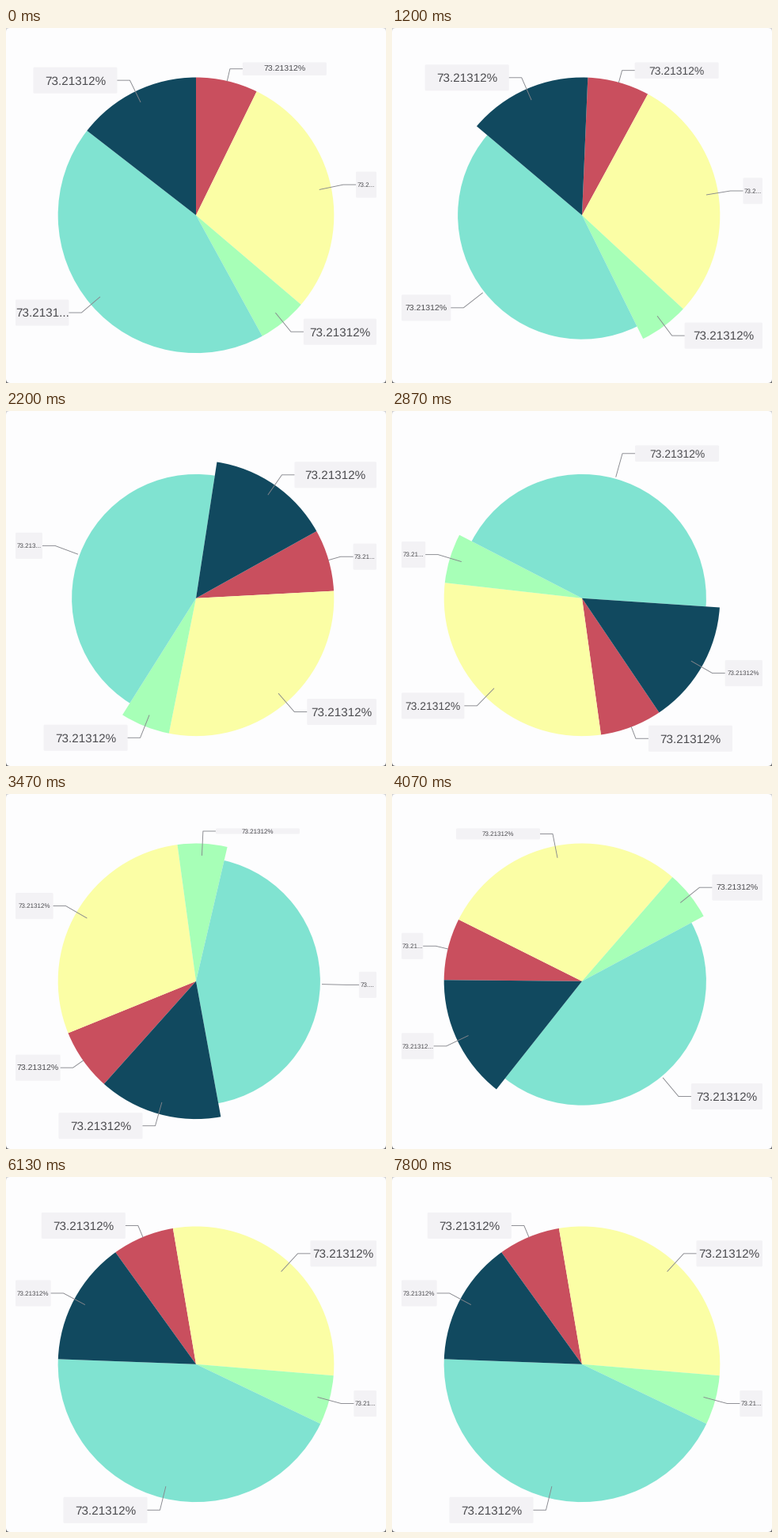
A matplotlib script for the animation above (7.87 s loop, 480 px wide and 449 px high).

```python
import numpy as np
import matplotlib.pyplot as plt
from matplotlib.animation import FuncAnimation
from matplotlib.patches import FancyBboxPatch, Rectangle, Wedge

plt.rcParams["text.hinting"] = "none"

W, H, DPI = 480, 449, 64
LOOP, TICK = 7870, 10
STEP = LOOP / 118                 # each pose holds for one step
CX, CY, R = 240, 236.8, 174.3
SMALL = 0.9                       # radius factor of the picked slice
ANCHOR, ELBOW, TAIL = 159.5, 190, 16
LEFT, RIGHT, TOP, BOTTOM = 12, 468, 43.5, 441
BOX_W, BOX_H = 106, 33
FONT_PX, LINE_H = 15.2, 17.5
SCALES = (1, 0.91, 0.69, 0.53)    # steps of the shrinking label font
LABEL = "73.21312%"

# share, colour, radius where the leader line becomes visible
SLICES = [
    (5, "#c94f5e", R),
    (20, "#fbfea5", ANCHOR),
    (4, "#a7ffb7", ANCHOR),
    (30, "#80e3d1", ANCHOR),
    (10, "#11495f", ANCHOR),
]
PICKED = 3
ENDS = np.cumsum([0] + [s[0] for s in SLICES]) * 360 / 69

# time in ms, rotation in degrees, speed in degrees per ms
SPIN = [
    (800, 0, 0),
    (1200, 2.4, 0.02),
    (2200, 60.8, 0.1),
    (3470, 222, 0.1),
    (4800, 305.7, 0.035),
    (5600, 324.3, 0),
]


def rotation(t):
    if t <= SPIN[0][0]:
        return 0
    for (t0, a, va), (t1, b, vb) in zip(SPIN, SPIN[1:]):
        if t < t1:
            d = t1 - t0
            u = (t - t0) / d
            return (a * (1 + 2 * u) * (1 - u) ** 2 + b * u * u * (3 - 2 * u)
                    + d * (va * u * (1 - u) ** 2 - vb * u * u * (1 - u)))
    return SPIN[-1][1]


def ease(t, start, length):
    u = np.clip((t - start) / length, 0, 1)
    return u * u * (3 - 2 * u)


def text_width(text):
    em = sum({".": 0.278, "%": 0.889}.get(c, 0.556) for c in text)
    return em * FONT_PX


def truncate(width):
    for n in range(len(LABEL) - 1, 0, -1):
        text = LABEL[:n] + "..."
        if text_width(text) <= width:
            return text
    return "..."


def fit(w, h, shrink=True):
    """Return the label text and font scale for a box of this size."""
    room = w + 0.3
    if not shrink:
        return truncate(room), 1
    for s in SCALES:
        if s * text_width(LABEL) <= w - 3 and s * LINE_H <= h - 4:
            return LABEL, s
    s = SCALES[-1]
    if s * text_width(LABEL) <= w - 3:
        return LABEL, s
    return truncate(room / s), s


def polar(angle, r):
    a = np.radians(angle)
    return CX + r * np.sin(a), CY - r * np.cos(a)


class Slice:
    def __init__(self, ax, i):
        self.i = i
        _, color, self.line_r = SLICES[i]
        self.wedge = ax.add_patch(Wedge((CX, CY), R, 0, 1, fc=color, ec="none", zorder=2))
        self.line, = ax.plot([], [], color="#85868c", lw=0.9 * 72 / DPI, zorder=3)
        self.box = ax.add_patch(FancyBboxPatch(
            (0, 0), 1, 1, boxstyle="round,pad=0,rounding_size=1.5",
            fc="#f3f2f5", ec="none", zorder=4))
        self.text = ax.text(0, 0, "", family="Liberation Sans", color="#4c4c50",
                            ha="center", va="baseline", zorder=5)

    def update(self, rot, radius):
        a, b = ENDS[self.i] + rot, ENDS[self.i + 1] + rot
        mid = (a + b) / 2
        self.wedge.set(theta1=a - 90, theta2=b - 90, radius=radius)

        x0, y0 = polar(mid, self.line_r)
        x1, y1 = polar(mid, ELBOW)
        if x1 >= CX:
            x2 = x1 + TAIL
            left, right = x2, min(x2 + BOX_W, RIGHT)
        else:
            x2 = x1 - TAIL
            left, right = max(x2 - BOX_W, LEFT), x2
        self.line.set_data([x0, x1, x2], [y0, y1, y1])

        half = max(1, min(BOX_H / 2, y1 - TOP, BOTTOM - y1))
        w, h = right - left, 2 * half
        self.box.set_bounds(left, y1 - half, w, h)

        # the picked label only starts shrinking once the pie turns
        label, s = fit(w, h, self.i != PICKED or rot > 0)
        px = s * FONT_PX
        self.text.set(text=label, fontsize=px * 72 / DPI,
                      position=((left + right) / 2, y1 + 0.345 * px))
        self.text.set_clip_path(self.box)


fig = plt.figure(figsize=(W / DPI, H / DPI), dpi=DPI, facecolor="#d4d4d6")
ax = fig.add_axes([0, 0, 1, 1])
ax.set(xlim=(0, W), ylim=(H, 0))
ax.axis("off")
ax.add_patch(Rectangle((0, H / 2), W, H / 2, fc="#6c6c6e", ec="none", zorder=0))
ax.add_patch(FancyBboxPatch((0, 0), W, H, boxstyle="round,pad=0,rounding_size=5",
                            fc="#fdfdfe", ec="none", zorder=1))
slices = [Slice(ax, i) for i in range(len(SLICES))]


def draw(frame):
    t = (frame * TICK + TICK / 2) // STEP * STEP
    rot = rotation(t)
    shrink = ease(t, 70, 300) - ease(t, 5630, 300)
    for s in slices:
        s.update(rot, R * (1 - (1 - SMALL) * shrink) if s.i == PICKED else R)
    return []


anim = FuncAnimation(fig, draw, frames=LOOP // TICK, interval=TICK,
                     init_func=lambda: draw(0), repeat=True, repeat_delay=0)
plt.show()
```
